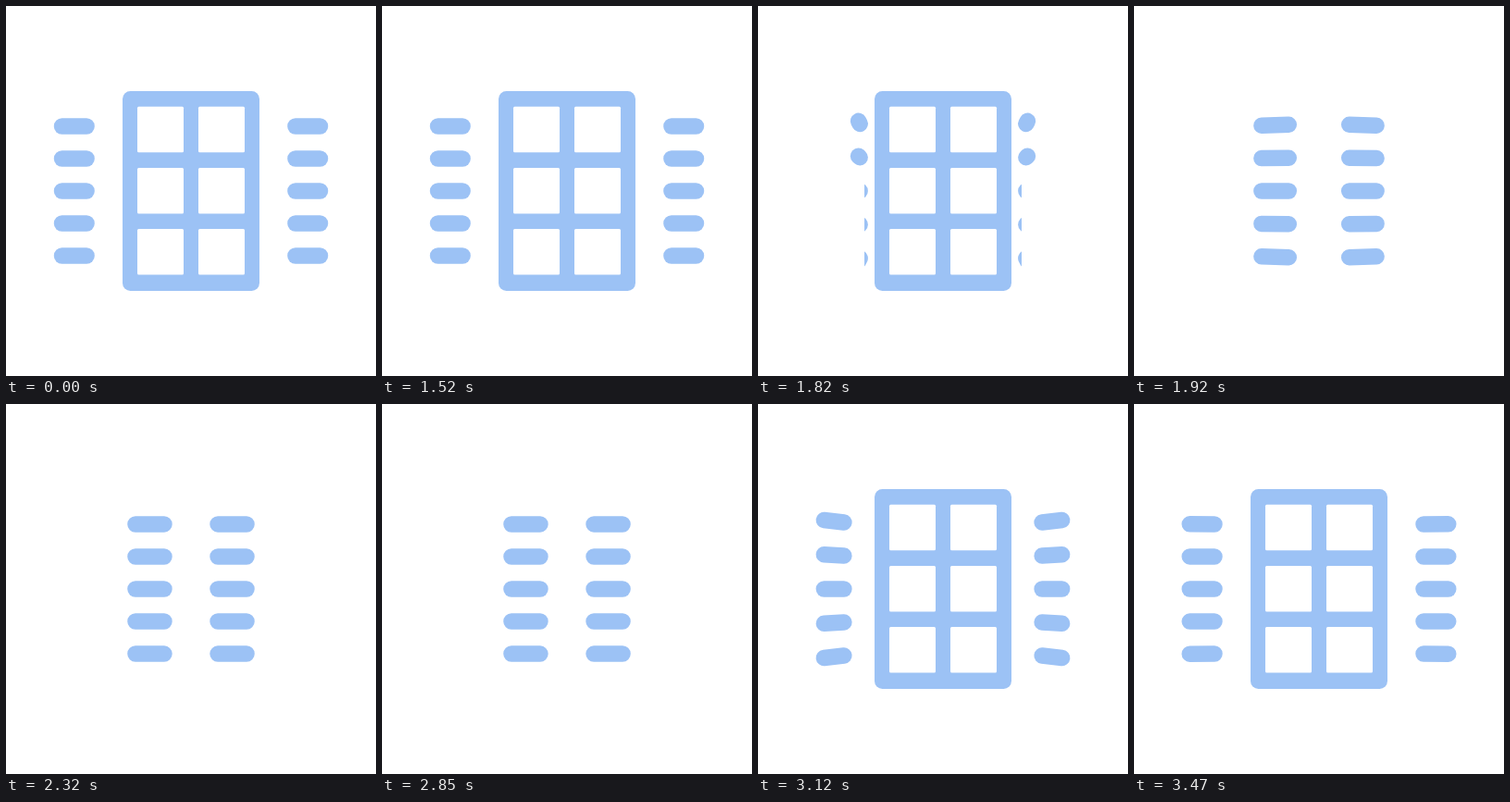
Animation of 400x400 px, one loop 3.52 s. Source, as an HTML page:

```html
<!DOCTYPE html>
<html lang="en">
<head>
<meta charset="utf-8">
<title>Window shutters</title>
<style>
  html, body { margin: 0; width: 100%; height: 100%; overflow: hidden; background: #fff; }
  svg { display: block; width: 100vw; height: 100vh; }
  .slat { stroke: #9cc2f5; stroke-width: 17.5; stroke-linecap: round; }
  .frame { fill: #9cc2f5; }
  .pane { fill: #fff; }
</style>
</head>
<body>
<svg viewBox="0 0 400 400">
  <defs>
    <clipPath id="gap"><rect id="gapRect" y="0" height="400"/></clipPath>
    <clipPath id="edge"><rect x="115" y="0" width="85" height="400"/></clipPath>
  </defs>
  <g id="window" clip-path="url(#gap)">
    <rect class="frame" x="126" y="92" width="148" height="216" rx="8.5"/>
  </g>
  <g id="left"></g>
  <g id="right" transform="matrix(-1 0 0 1 400 0)"></g>
</svg>
<script>
const LOOP = 3520, CLOSE_AT = 1520, OPEN_AT = 2820, STEP = 25;
const CLOSE_FALL = 423, OPEN_FALL = 361;
const MID = 200, HINGE = 111.5, DEPTH = 800;
const SLAT_FROM = 28.5, SLAT_TO = 59.5, SHUTTER = 97.5, ROW = 35;

const $ = id => document.getElementById(id);

function add(parent, tag, attrs) {
  const el = document.createElementNS("http://www.w3.org/2000/svg", tag);
  for (const key in attrs) el.setAttribute(key, attrs[key]);
  return parent.appendChild(el);
}

for (let row = 0; row < 3; row++)
  for (const x of [142, 208])
    add($("window"), "rect", { class: "pane", x, y: 108.8 + 66.1 * row, width: 50, height: 49.5, rx: 1.5 });

const slats = [];
for (const side of ["left", "right"])
  for (let row = -2; row <= 2; row++) {
    const group = add($(side), "g", {});
    slats.push({ row, group, line: add(group, "line", { class: "slat" }) });
  }

// Share of the swing still to go: an accelerating fall, then small rebounds.
function swing(t, fall) {
  if (t < fall) return 1 - (t / fall) ** 1.9;
  t -= fall;
  for (const height of [0.078, 0.0195, 0.005]) {
    const half = fall * Math.sqrt(height);
    if (t < 2 * half) return height * (1 - ((t - half) / half) ** 2);
    t -= 2 * half;
  }
  return 0;
}

// 0 is shut, PI is fully open.
function angleAt(t) {
  const since = start => Math.floor((t - start) / STEP) * STEP;
  if (t < CLOSE_AT) return Math.PI;
  if (t < OPEN_AT) return Math.PI * swing(since(CLOSE_AT), CLOSE_FALL);
  return Math.PI * (1 - swing(since(OPEN_AT), OPEN_FALL));
}

// Perspective position of a point on the left shutter, d away from the hinge.
function project(d, angle) {
  const c = Math.cos(angle);
  const reach = d * c * (c < 0 ? 1 + 0.143 * c : 1);
  const scale = 1 / (1 - d * Math.sin(angle) / DEPTH);
  return { x: MID - (MID - HINGE - reach) * scale, scale };
}

function draw(t) {
  const angle = angleAt(t), c = Math.cos(angle);
  const a = project(SLAT_FROM, angle), b = project(SLAT_TO, angle);
  const edgeOn = c > 0 && c < 0.1;

  for (const { row, group, line } of slats) {
    line.setAttribute("x1", a.x);
    line.setAttribute("y1", MID + row * ROW * a.scale);
    line.setAttribute("x2", b.x);
    line.setAttribute("y2", MID + row * ROW * b.scale);
    group.setAttribute("clip-path", edgeOn && row >= 0 ? "url(#edge)" : "none");
  }

  const from = c > 0 ? Math.min(MID, project(SHUTTER, angle).x) : 0;
  $("gapRect").setAttribute("x", from);
  $("gapRect").setAttribute("width", 2 * (MID - from));
}

const start = performance.now();
function tick() {
  draw((performance.now() - start) % LOOP);
  requestAnimationFrame(tick);
}
tick();
</script>
</body>
</html>
```
